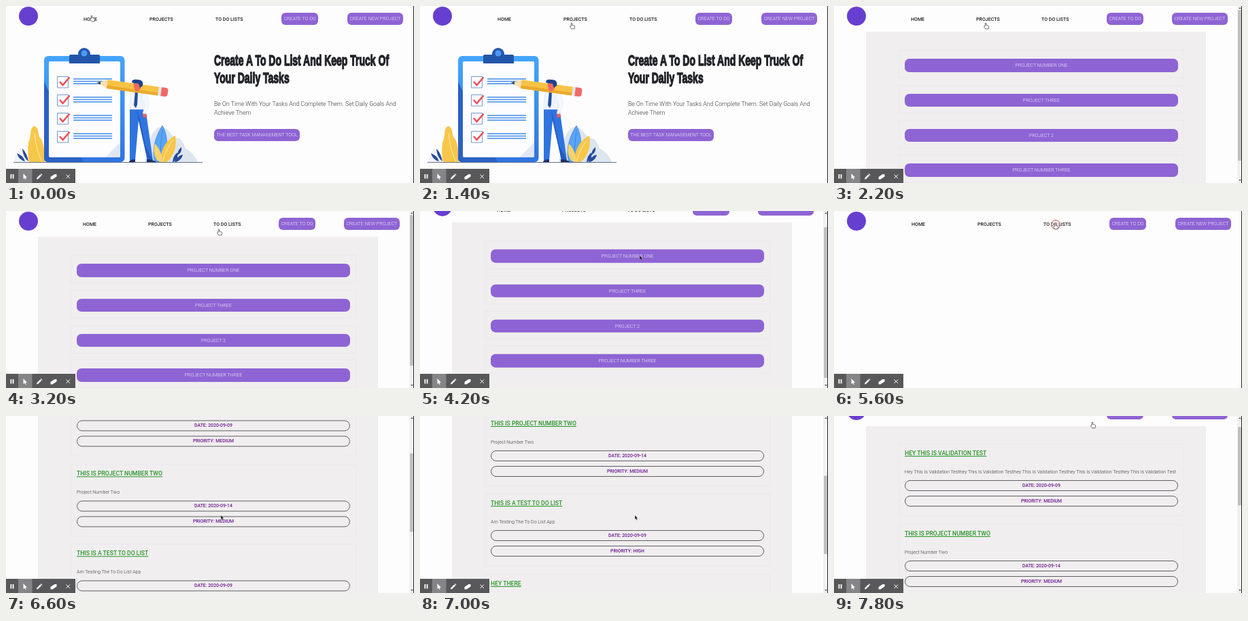
Recreate the animation shown at these times as an HTML page. Size 600 by 262 pixels, loop 8000 ms.

```html
<!DOCTYPE html>
<html lang="en">
<head>
<meta charset="utf-8">
<title>To do list tour</title>
<style>
@property --s { syntax: '<number>'; inherits: true; initial-value: 0; }
html, body { margin: 0; width: 100%; height: 100%; overflow: hidden; background: #fefdfe; }
body { font-family: Roboto, 'Open Sans', sans-serif; }
#stage { position: relative; width: 600px; height: 262px; overflow: hidden; background: #fefdfe; }
#stage div, #stage svg { position: absolute; box-sizing: border-box; white-space: pre; }
#stage .page { inset: 0; overflow: hidden; }
.sheet { inset: 0; transform: translateY(calc(var(--s) * -1px)); }

/* Navigation */
.page { --step: 96px; }
#home { --step: 97px; }
.logo { left: 19px; top: 1px; width: 28px; height: 28px; border-radius: 50%; background: #673fd0; }
.nav { left: calc(17px + var(--i) * var(--step)); top: 12px; font: 500 7.05px/15px Roboto, sans-serif; color: #1c1c1e; }
.btn { padding: 0 3.5px; border-radius: 6px; background: #8e64d4; color: #f6f0ff; font: 300 7.08px/17.5px Roboto, sans-serif; }
.nav.btn { top: 10px; font: 300 7.1px/17.5px Roboto, sans-serif; color: #f6f0ff; }

/* Landing page */
.title { left: 306px; top: 67.5px; font: 700 22px/26px 'Liberation Sans', sans-serif; color: #222428;
  -webkit-text-stroke: 1.4px #222428; transform: scaleX(.636); transform-origin: 0 0; }
.lead { left: 306px; top: 139px; font: 300 8.75px/13.2px Roboto, sans-serif; color: #333; }
.tag { left: 306px; top: 182px; }
#art { left: 0; top: 0; }

/* Lists */
.panel { left: 47px; top: 38px; width: 500px; background: #f0eeef; }
.card { left: 95px; width: 420px; border: 1px solid #ebe9ec; }
.bar { left: 8px; top: 12px; width: 402px; height: 19.5px; border-radius: 7px; background: #8e64d4;
  color: #f6f0ff; text-align: center; font: 300 7.15px/19.5px Roboto, sans-serif; }
.name { left: 8px; top: 6px; font: 500 8.65px/14px Roboto, sans-serif; color: #259425; text-decoration: underline; }
.note { left: 8px; top: 35px; font: 300 7.03px/12px Roboto, sans-serif; color: #333; }
.pill { left: 8px; width: 402px; height: 16px; border: 1px solid #5e5e62; border-radius: 8px; text-align: center;
  font: 500 6.87px/14px Roboto, sans-serif; color: #6b1690; }
.rail { left: 593px; top: 0; width: 7px; height: 262px; background: #f2f1f2; }
.thumb { left: 1px; top: 6px; width: 5px; background: #c1c0c1; transform: translateY(calc(var(--s) * var(--k) * 1px)); }
.up, .down { left: 1.5px; border: 2px solid transparent; }
.up { top: 0; border-bottom-color: #555; }
.down { top: 257px; border-top-color: #555; }
.edge { left: 599px; top: 0; width: 1px; height: 262px; background: #242326; }

/* Timeline */
#home { animation: home 8s step-end infinite; }
#hero { inset: 0; animation: hero 8s step-end infinite; }
#projects { animation: projects 8s step-end infinite, scrollA 8s infinite; }
#todos { animation: todos 8s step-end infinite, scrollB 8s infinite; }
#cursor { left: 0; top: 0; overflow: visible; animation: move 8s infinite; }
#hand { animation: hand 8s step-end infinite; }
#arrow { animation: arrow 8s step-end infinite; }
#ring { animation: ring 8s step-end infinite; }
@keyframes home { 0%, 70% { visibility: visible } 25%, 72.5%, 100% { visibility: hidden } }
@keyframes hero { 0% { opacity: 1 } 22.5%, 100% { opacity: 0 } }
@keyframes projects { 0%, 70%, 100% { visibility: hidden } 25% { visibility: visible } }
@keyframes todos { 0% { visibility: hidden } 72.5%, 100% { visibility: visible } }
@keyframes scrollA {
  0%, 50% { --s: 0; animation-timing-function: steps(3, start) }
  57.5% { --s: 32 }
  62.5% { --s: 32; animation-timing-function: steps(2, start) }
  67.5%, 100% { --s: 0 }
}
@keyframes scrollB {
  0% { --s: 0 }
  77.5% { --s: 0; animation-timing-function: steps(5, start) }
  90% { --s: 186; animation-timing-function: steps(4, start) }
  100% { --s: 23 }
}
@keyframes move {
  0% { transform: translate(126px, 14px) }
  2.5% { transform: translate(126px, 14px); animation-timing-function: steps(5, start) }
  15% { transform: translate(223px, 25px) }
  37.5% { transform: translate(223px, 25px); animation-timing-function: steps(2, start) }
  42.5% { transform: translate(313px, 27px); animation-timing-function: steps(2, start) }
  47.5% { transform: translate(323px, 66px) }
  62.5% { transform: translate(323px, 66px); animation-timing-function: steps(2, start) }
  67.5% { transform: translate(325px, 18px) }
  72.5% { transform: translate(325px, 18px); animation-timing-function: steps(3, start) }
  80% { transform: translate(316px, 147px) }
  92.5% { transform: translate(316px, 147px); animation-timing-function: steps(3, start) }
  100% { transform: translate(380px, 9px) }
}
@keyframes hand {
  0%, 12.5%, 40%, 65%, 97.5%, 100% { opacity: 1 }
  5%, 37.5%, 42.5%, 72.5% { opacity: 0 }
}
@keyframes arrow {
  0%, 12.5%, 40%, 65%, 97.5%, 100% { opacity: 0 }
  5%, 37.5%, 42.5%, 72.5% { opacity: 1 }
}
@keyframes ring { 0%, 25%, 72.5%, 100% { opacity: 0 } 20%, 67.5% { opacity: 1 } }
</style>
</head>
<body>
<div id="stage">
  <div class="page" id="home">
    <div class="sheet"></div>
    <div id="hero">
      <svg id="art" width="300" height="262" viewBox="0 0 300 262">
        <defs>
          <linearGradient id="frame" x2="0" y2="1">
            <stop stop-color="#45a6fb"/><stop offset="1" stop-color="#2f74e0"/>
          </linearGradient>
        </defs>
        <!-- Plants and hills behind -->
        <path d="M204 231c4-20 8-44 20-51 12-4 18 10 24 15 9 0 12 5 16 16 7 3 14 10 18 20z" fill="#dde5ee"/>
        <path d="M12 231q1-14 9-20 8 2 14 20z" fill="#f0f2f6"/>
        <path d="M34 231c-3-16-2-28 1-34 2-8 0-16 6-19 7 0 6 10 8 16 6 4 8 20 8 37z" fill="#f7c74a"/>
        <path d="M53 231Q44 212 42 188" fill="none" stroke="#fff" stroke-width=".6"/>
        <path d="M33 230q-2-12-9-19 1 13 9 19M28 230q-3-9-12-12 3 10 12 12" fill="#274b9b"/>
        <path d="M219 231c-6-20 3-42 11-54 8 13 9 34 2 54z" fill="#58a5f5" stroke="#2f6fd6" stroke-width=".6"/>
        <path d="M225 231q3-26 5-48" fill="none" stroke="#2f6fd6" stroke-width=".6"/>
        <path d="M227 231c0-17 8-33 22-39 3 15-2 31-13 39z" fill="#f7c74a"/>
        <path d="M230 231q5-20 16-33" fill="none" stroke="#fff" stroke-width=".6"/>
        <path d="M226 231c-9-5-10-18-7-27 7 6 11 18 11 27z" fill="#f9d36e"/>
        <g fill="#274b9b">
          <path d="M245 231q1-10 7-14 2 9-6 14M248 231q3-9 12-11-2 9-11 11M252 221q1-9 6-12 1 8-6 12"/>
        </g>
        <!-- Clipboard -->
        <rect x="56" y="74" width="118.5" height="157" rx="6" fill="url(#frame)"/>
        <path d="M56 112l58 119H62q-6 0-6-6z" fill="#2a61c4"/>
        <rect x="63" y="82" width="105" height="142" rx="2" fill="#fdfdff"/>
        <path d="M168 202v20q0 2-2 2h-20z" fill="#dfe8f6"/>
        <circle cx="115" cy="71" r="9" fill="#2556ad"/>
        <path d="M93 85V74q0-2 2-2h41q2 0 2 2v11z" fill="#2355ab"/>
        <circle cx="115" cy="70" r="4.500" fill="#4b9af3"/>
        <g id="checks"></g>
        <!-- Worker -->
        <path d="M182 151h23l11 77h-8l-13-59-5 59h-8z" fill="#2f74df"/>
        <path d="M193 153l4 17 8 37 11 21h-8l-13-59z" fill="#235bbd"/>
        <path d="M181 231q0-4 9-4v4zM207 231v-4q9 0 14 4z" fill="#1c2f63"/>
        <path d="M183 127q10-8 21 0l2 26h-24z" fill="#eef3fc" stroke="#d4deef" stroke-width=".5"/>
        <path d="M203 127q9 10 7 22l-6 13-3-2 3-14-5-11z" fill="#f5f8fe" stroke="#d4deef" stroke-width=".5"/>
        <path d="M201 159l4 1 3 3-6 3z" fill="#ef5f5f"/>
        <path d="M190 126h4l-1 20-2 5-3-4z" fill="#234b9c"/>
        <!-- Pencil -->
        <g transform="translate(134 113.500) rotate(8)">
          <path d="M0 0L15-6.500v13z" fill="#fbe0b4"/>
          <path d="M0 0L5-2.200v4.400z" fill="#24375f"/>
          <path d="M15-6.500h76v13H15z" fill="#f8c344"/>
          <path d="M15 2h76v4.500H15z" fill="#eaa92d"/>
          <path d="M91-6.500h4v13h-4z" fill="#dfe5ef"/>
          <path d="M95-6.500h6q4 0 4 4v5q0 4-4 4h-6z" fill="#ee6a66"/>
        </g>
        <path d="M188 113q6-3 10 1v8q-4 6-8 3-3-4-2-12z" fill="#ef6a62"/>
        <path d="M185 113q0-5 8-4 10 0 8 9l-4 3-2-6-8-1z" fill="#20428f"/>
        <path d="M11 231.500h278" stroke="#3a4c74" stroke-width=".8"/>
      </svg>
      <div class="title">Create A To Do List And Keep Truck Of
Your Daily Tasks</div>
      <div class="lead">Be On Time With Your Tasks And Complete Them. Set Daily Goals And
Achieve Them</div>
      <div class="btn tag">THE BEST TASK MANAGEMENT TOOL</div>
    </div>
  </div>
  <div class="page" id="projects" style="--k:.85"><div class="sheet"></div></div>
  <div class="page" id="todos" style="--k:.4425"><div class="sheet"></div></div>
  <div class="edge"></div>
  <svg id="cursor" width="1" height="1">
    <g id="ring"><circle cx="1" cy="2.2" r="6.6" fill="#f4dede" fill-opacity=".35" stroke="#dc5050"/></g>
    <path id="hand" d="M-.8 5V.6q.8-1.2 1.6 0v2.8l3 .7q1 .3.9 1.4L4 8.800H-.2L-2.600 5.600q.4-1.200 1.800-.6z" fill="#fff" stroke="#3c3c40" stroke-width=".75" stroke-linejoin="round"/>
    <path id="arrow" d="M0 0v6l1.400-1.200 1.100 2.400 1.100-.5-1.100-2.300h1.900z" fill="#161618" stroke="#fff" stroke-width=".25"/>
  </svg>
  <svg style="left:0;top:241px" width="102" height="21">
    <path d="M0 0h102v21H0z" fill="#58585a"/>
    <path d="M18 0h20.500v21H18z" fill="#858587"/>
    <g fill="#fff">
      <path d="M6.500 8h1.800v6.500H6.500zM9.700 8h1.800v6.500H9.700z"/>
      <path d="M25.500 7v8l1.800-1.600 1.300 2.700 1.200-.6-1.300-2.600h2.500z"/>
      <path d="M45 15.500l.5-2.300 4.700-4.700 1.800 1.800-4.700 4.700zM50.800 7.900l.9-.8 1.800 1.800-.9.8z"/>
      <path d="M65.500 12l6-4h3v3.500l-6 4h-3z"/>
    </g>
    <path d="M88.500 8.500l5.500 5.500M94 8.500l-5.500 5.500" stroke="#fff"/>
  </svg>
</div>
<script>
const $ = s => document.querySelector(s);
const box = (cls, text = '', style = '') => `<div class="${cls}" style="${style}">${text}</div>`;

const links = ['HOME', 'PROJECTS', 'TO DO LISTS', 'CREATE TO DO', 'CREATE NEW PROJECT'];
const nav = box('logo') + links.map((text, i) =>
  box(i > 2 ? 'nav btn' : 'nav', text, `--i:${i + 1}`)).join('');

const rail = docHeight => box('rail',
  box('up') + box('thumb', '', `height:${250 * 262 / docHeight}px`) + box('down'));

function fill(page, cards, top, pitch, height, docHeight) {
  const list = cards.map((html, i) =>
    box('card', html, `top:${top + i * pitch}px;height:${height}px`)).join('');
  $(page + ' .sheet').innerHTML = nav + box('panel', '', `height:${docHeight - 38}px`) + list;
  $(page).insertAdjacentHTML('beforeend', rail(docHeight));
}

const projects = ['PROJECT NUMBER ONE', 'PROJECT THREE', 'PROJECT 2', 'PROJECT NUMBER THREE'];
const check = 'his Is Validation Test';
const todos = [
  ['HEY THIS IS VALIDATION TEST', 'Hey T' + check + ('hey T' + check).repeat(4), '2020-09-09', 'MEDIUM'],
  ['THIS IS PROJECT NUMBER TWO', 'Project Number Two', '2020-09-14', 'MEDIUM'],
  ['THIS IS A TEST TO DO LIST', 'Am Testing The To Do List App', '2020-09-09', 'HIGH'],
  ['HEY THERE', 'Hey There', '2020-09-09', 'LOW']
];

$('#home .sheet').innerHTML = nav;
fill('#projects', projects.map(p => box('bar', p)), 65, 51.8, 42, 294);
fill('#todos', todos.map(([name, note, date, level]) =>
  box('name', name) + box('note', note) +
  box('pill', 'DATE: ' + date, 'top:53px') +
  box('pill', 'PRIORITY: ' + level, 'top:76px')), 64, 118.5, 107, 565);

// Four checklist rows on the clipboard
$('#checks').innerHTML = [0, 1, 2, 3].map(i => `<g transform="translate(0 ${i * 27})" fill="none">
  <path d="M75.500 104.500h16v16.500h-16z" stroke="#7798cf"/>
  <path d="M79 112l4.500 5 10-11.500" stroke="#ea5058" stroke-width="2.600"/>
  <path d="M99 108h57M99 111.500h57M99 115h57" stroke="#3f8be6" stroke-width="1.500"/>
</g>`).join('');
</script>
</body>
</html>
```
